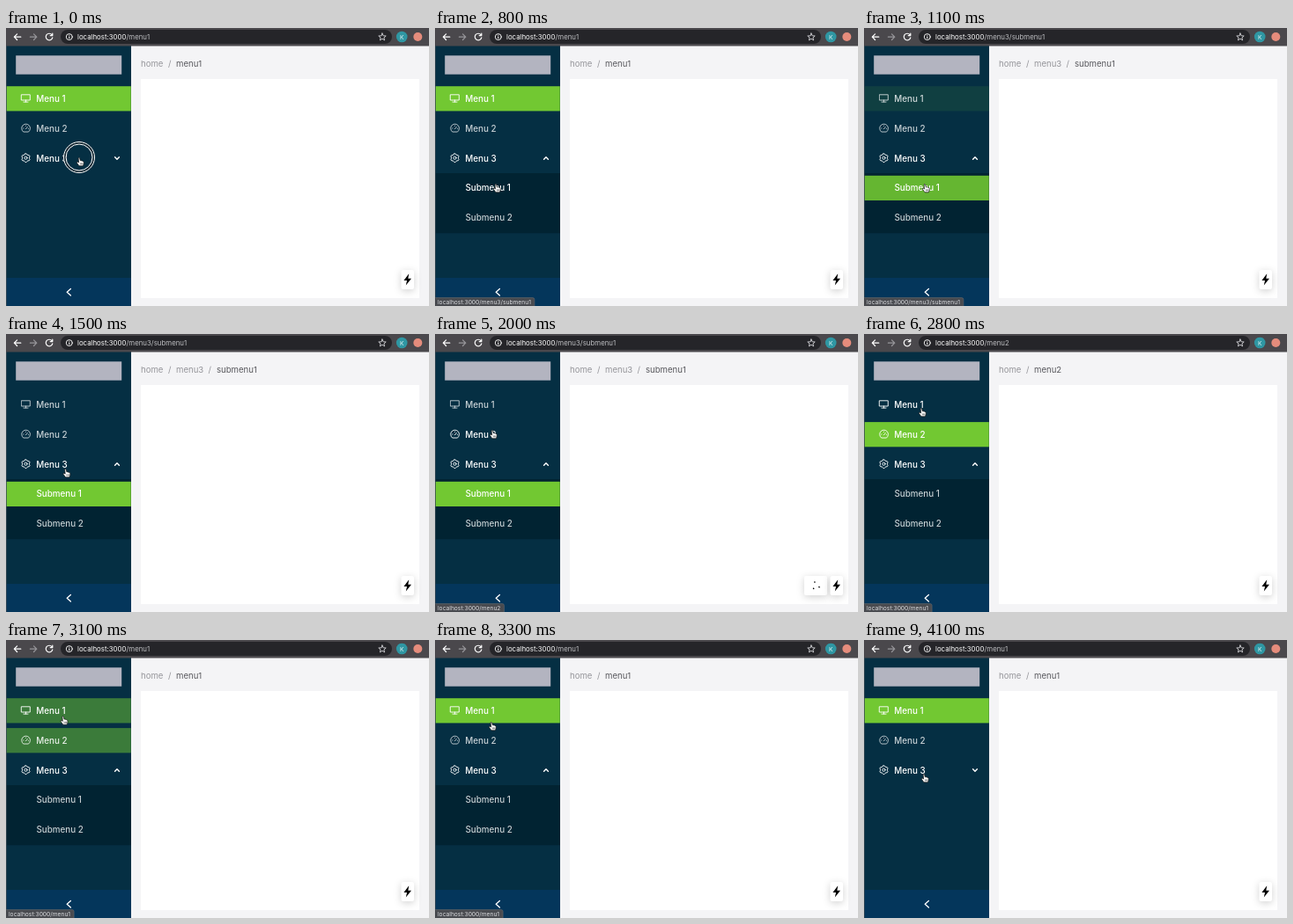
Write an HTML page that moves like this. It is 480x316 px and loops after 4.6 s.

```html
<!DOCTYPE html>
<html lang="en">
<head>
<meta charset="utf-8">
<title>Sidebar menu</title>
<style>
  html, body { margin: 0; width: 100%; height: 100%; overflow: hidden; background: #f4f4f6; }
  svg { display: block; width: 480px; height: 316px; font-family: Inter, sans-serif; }
  .item { font-size: 9.85px; font-weight: 500; fill: #fff; }
  .crumb { font-size: 9.6px; fill: #95959a; }
  .url { font-size: 7.85px; fill: #bdbec1; }
  .line { fill: none; stroke: #fff; stroke-linecap: round; stroke-linejoin: round; }
  .card { fill: #fff; filter: drop-shadow(0 2px 4px rgba(0, 0, 0, .18)); }
</style>
</head>
<body>
<svg viewBox="0 0 480 316">
  <defs>
    <clipPath id="fold"><rect id="foldBox" x="0" y="165" width="142" height="0"/></clipPath>
  </defs>
  <rect width="480" height="316" fill="#f4f4f6"/>
  <rect x="153" y="58" width="316" height="249" fill="#fff"/>

  <!-- sidebar -->
  <rect y="20" width="142" height="296" fill="#052f43"/>
  <rect x="11.2" y="31.3" width="120" height="21.4" fill="#b3b4c0"/>
  <g id="m1">
    <rect y="66.2" width="141.8" height="28.2" fill="#72c832"/>
    <g class="label">
      <text class="item" x="34.3" y="83.5">Menu 1</text>
      <path class="line" stroke-width=".9" d="M17.7 75.8h9.6v6.2h-9.6zM22.5 82v2M20 84.1h5"/>
    </g>
  </g>
  <g id="m2">
    <rect y="100.1" width="141.8" height="28.2" fill="#72c832"/>
    <g class="label">
      <text class="item" x="34.3" y="117.5">Menu 2</text>
      <path class="line" stroke-width=".9" d="M19.4 117.8a4.9 4.9 0 1 1 6.4 0zM22.4 114.8l2-2.2M19.7 114h.3M22.6 111.2v.2M25.3 114.4h.2"/>
    </g>
  </g>
  <text class="item" x="34.3" y="151.5">Menu 3</text>
  <path id="gear" class="line"/>
  <circle class="line" cx="22.5" cy="147.7" r="1.6" stroke-width=".9"/>
  <polyline id="arrow" class="line" stroke-width="1.4"/>
  <g id="sub" clip-path="url(#fold)">
    <rect y="165" width="142" height="68.5" fill="#012332"/>
    <g id="s1">
      <rect y="167.8" width="141.8" height="28.2" fill="#72c832"/>
      <g class="label"><text class="item" x="34.4" y="185.3">Submenu 1</text></g>
    </g>
    <text class="item" x="34.4" y="219.3" opacity=".78">Submenu 2</text>
  </g>
  <rect y="284" width="142" height="32" fill="#04365b"/>
  <path class="line" stroke-width="1.3" d="M73.4 296.4l-4.2 3.8 4.2 3.8"/>
  <rect y="20" width=".8" height="296" fill="#3a4c57"/>

  <!-- browser bar -->
  <rect width="480" height="20.5" fill="#4a484c"/>
  <rect x="62" y="2" width="376" height="16" rx="8" fill="#252529"/>
  <path class="line" stroke-width="1.2" d="M16.8 10.2H9.4M12.6 6.9l-3.3 3.3 3.3 3.3"/>
  <path class="line" stroke-width="1.2" style="stroke:#97969a" d="M27.4 10.2H34.8M31.5 6.9l3.3 3.3-3.3 3.3"/>
  <path class="line" stroke-width="1.2" d="M52 7.6a3.8 3.8 0 1 0 .8 3.3M52.8 6v2.6h-2.6"/>
  <circle class="line" cx="71.8" cy="10.1" r="3.5" stroke-width=".9"/>
  <path class="line" d="M71.8 9.9v1.9M71.8 8.1v.1"/>
  <text class="url" x="81" y="13"><tspan fill="#fff">localhost:3000</tspan><tspan id="path"></tspan></text>
  <path class="line" stroke-width=".9" style="stroke:#d5d5d8" d="M427 6l1.2 2.8 3 .2-2.3 2 .7 2.9-2.6-1.6-2.6 1.6.7-2.9-2.3-2 3-.2z"/>
  <circle cx="449.2" cy="10" r="6.3" fill="#2f97a3"/>
  <text x="449.2" y="12.5" font-size="6.6" fill="#e4f3f4" text-anchor="middle">K</text>
  <circle cx="467.3" cy="10" r="5" fill="#e58c7c"/>

  <!-- breadcrumb -->
  <text class="crumb" x="153" y="43.6">home</text>
  <text class="crumb" x="184" y="43.6">/</text>
  <text class="crumb" id="crumb1" x="193" y="43.6"></text>
  <g id="deep">
    <text class="crumb" x="229.5" y="43.6">/</text>
    <text class="crumb" x="239" y="43.6" style="fill:#58585d">submenu1</text>
  </g>

  <!-- badges -->
  <g id="loader">
    <rect class="card" x="419" y="275" width="26" height="22" rx="2"/>
    <g id="dots"><circle cx="432" cy="281.8" r=".8"/><circle cx="428.8" cy="288.6" r=".8"/><circle cx="435.4" cy="288.6" r=".8"/></g>
  </g>
  <rect class="card" x="448.5" y="275" width="14.5" height="22" rx="2.5"/>
  <path d="M457.2 279.3l-5.8 7.6h3.6l-1.2 5.6 6.2-7.8h-3.7z"/>

  <!-- link hint -->
  <g id="hint">
    <rect id="hintBox" x="-2" y="306.6" height="12" rx="2" fill="#494b50" stroke="#66696e" stroke-width=".6"/>
    <text id="hintText" x="3" y="313.9" font-size="6.7" fill="#dcdde0"></text>
  </g>

  <!-- pointer -->
  <g id="hand">
    <path fill="#fff" stroke="#111" stroke-width=".7" stroke-linejoin="round"
      d="M-1.9 -4.2q.9 -1 1.6 .2l.6 2.8q.9 -.5 1.5 .2q.9 -.3 1.3 .5q1 -.1 1.2 1.1l-.2 2.2l-.7 2h-4.4l-2.6 -3.6q-.4 -1.3 1 -1l1.2 .8z"/>
    <path fill="none" stroke="#111" stroke-width=".5" d="M.3 1.4v2M1.6 1.4v2M2.8 1.4v2"/>
  </g>
  <g id="ring" fill="none">
    <circle r="16.3" stroke="#10242f" stroke-width="3"/>
    <circle r="17.5" stroke="#fff" stroke-width="1"/>
    <circle r="15" stroke="#fff" stroke-width="1"/>
  </g>
</svg>
<script>
const LOOP = 4600, STEP = 100;
const $ = id => document.getElementById(id);
const set = (id, attrs) => { for (const k in attrs) $(id).setAttribute(k, attrs[k]); };
const show = (id, on) => set(id, { visibility: on ? 'visible' : 'hidden' });
const clamp = v => Math.min(1, Math.max(0, v));
const ease = v => v * v * (3 - 2 * v);
const ramp = (t, start, len = 300) => ease(clamp((t - start) / len));
const within = (t, a, b) => t >= a && t < b;

// time, x, y of the pointer
const track = [
  [0, 84, 152], [200, 84, 152], [700, 70, 182], [1300, 70, 182],
  [1800, 66, 114], [2400, 66, 114], [2700, 66, 89], [3000, 66, 89],
  [3300, 65, 98], [3600, 69, 157], [4600, 69, 157]
];
const clicks = [[0, 200], [900, 1000], [1900, 2000], [2900, 3000], [3700, 3800]];
const links = [
  { id: 'm1', y: 66, path: '/menu1' },
  { id: 'm2', y: 100, path: '/menu2' },
  { id: 's1', y: 167, path: '/menu3/submenu1' }
];

function pointer(t) {
  const i = track.findIndex(p => p[0] > t);
  const [t0, x0, y0] = track[i - 1], [t1, x1, y1] = track[i];
  const k = ease((t - t0) / (t1 - t0));
  return [x0 + (x1 - x0) * k, y0 + (y1 - y0) * k];
}

// six teeth, one pointing up
function gearPath() {
  let d = '';
  for (let i = 0; i < 24; i++) {
    const a = (i - .5) * Math.PI / 12, r = i % 4 < 2 ? 4.9 : 4;
    d += (i ? 'L' : 'M') + (22.5 + r * Math.sin(a)).toFixed(2) + ' ' + (147.7 - r * Math.cos(a)).toFixed(2);
  }
  return d + 'z';
}

function draw(t) {
  const [x, y] = pointer(t);
  const open = ramp(t, 100) - ramp(t, 3700);
  const chosen = {
    m1: 1 - ramp(t, 860) + ramp(t, 2950),
    m2: ramp(t, 2150) - ramp(t, 2950),
    s1: ramp(t, 860) - ramp(t, 2150)
  };
  let target = null;
  for (const link of links) {
    const tip = y - 5;
    const hover = within(tip, link.y, link.y + 28.5) && (link.id !== 's1' || open > .9);
    if (hover) target = link;
    const node = $(link.id);
    node.firstElementChild.setAttribute('opacity', chosen[link.id]);
    node.querySelector('.label').setAttribute('opacity', hover ? 1 : .78 + .22 * chosen[link.id]);
  }

  set('foldBox', { height: 68.5 * open });
  set('sub', { opacity: open });
  const d = 1.2 * (1 - 2 * open);
  set('arrow', { points: `123.6,${148 - d} 126,${148 + d} 128.4,${148 - d}` });

  const page = links[within(t, 1000, 2200) ? 2 : within(t, 2200, 3000) ? 1 : 0];
  const deep = page.id === 's1';
  $('path').textContent = page.path;
  $('crumb1').textContent = page.path.split('/')[1];
  $('crumb1').style.fill = deep ? '#95959a' : '#58585d';
  show('deep', deep);

  show('hint', target);
  if (target) {
    $('hintText').textContent = 'localhost:3000' + target.path;
    set('hintBox', { width: $('hintText').getComputedTextLength() + 9 });
  }

  set('loader', { opacity: clamp((t - 1800) / 200) - clamp((t - 2100) / 200) });
  set('dots', { transform: `rotate(${(t - 2000) * .3 - 15} 432 286)` });
  set('hand', { transform: `translate(${x} ${y})` });
  set('ring', { transform: `translate(${x - 1} ${y - 5})` });
  show('ring', clicks.some(c => within(t, ...c)));
}

set('gear', { d: gearPath(), 'stroke-width': .9 });
const begin = performance.now();
function frame(now) {
  const t = Math.max(0, now - begin) % LOOP;
  draw(Math.floor(t / STEP) * STEP);
  requestAnimationFrame(frame);
}
draw(0);
requestAnimationFrame(frame);
</script>
</body>
</html>
```
